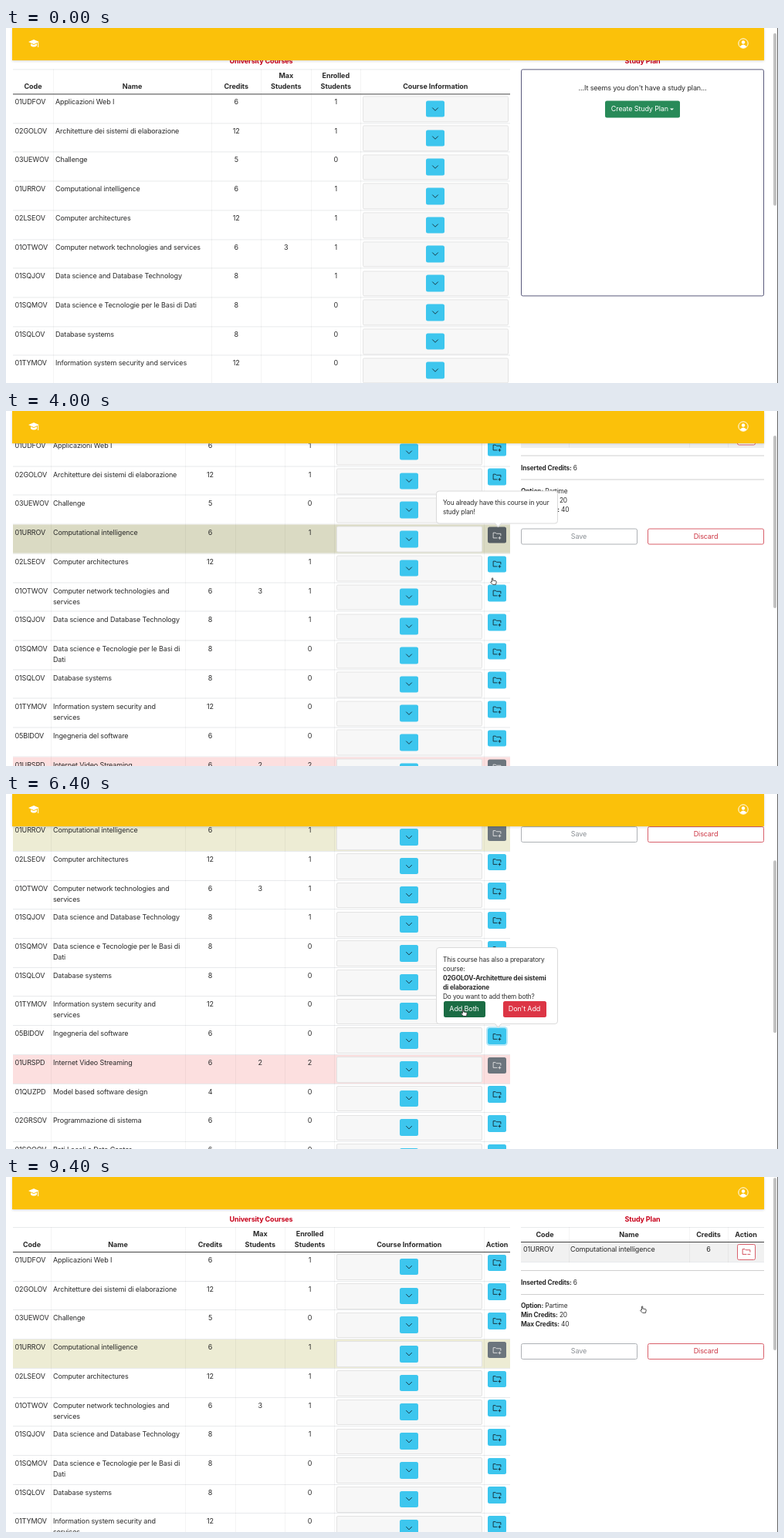
Animation of 1000 by 461 pixels, one loop 9.9 s. Source, as an HTML page:

```html
<!DOCTYPE html>
<html lang="en">
<head>
<meta charset="utf-8">
<title>Study plan</title>
<style>
html, body { margin: 0; width: 100%; height: 100%; overflow: hidden; background: #fff; }
#stage { position: relative; width: 1000px; height: 461px; overflow: hidden; color: #2a2a2a;
  font: 9px/14px Inter, sans-serif; letter-spacing: -.13px; }
#stage div { position: absolute; box-sizing: border-box; }
#stage [hidden] { display: none; }
svg { display: block; fill: none; stroke: currentColor; }
.layer { left: 0; top: 0; width: 1000px; height: 0; }
.t { white-space: pre; }
.c { width: 200px; margin-left: -100px; text-align: center; }
.b, b { font-weight: 700; }
.b { letter-spacing: -.05px; }
.title { font-weight: 700; color: #c8001a; }
.small { font-size: 8.3px; }
.line { background: #e8eaec; }
.dark { background: #444; }
.hr { background: #cfcfcf; }
.col { background: rgba(0, 0, 0, .045); }
.row { border-bottom: 1px solid #e8eaec; }
.taken { background: #edecd4; }
.blocked { background: #f99898; }
.full { background: #fcdfdf; }
.hover { box-shadow: inset 0 0 0 99px rgba(0, 0, 0, .08); }
.stripe.hover { box-shadow: inset 0 0 0 99px rgba(0, 0, 0, .045); }
.fold { background: #f7f7f7; border: 1px solid #e3e3e3; border-radius: 2px; }
.blocked .fold { background: #fff; }
.btn { display: flex; align-items: center; justify-content: center; border-radius: 2.5px; white-space: pre; }
.info { background: #3dc6ee; color: #14242b; }
.taken .add, .blocked .add, .full .add { background: #6c757d; color: #e8e8e8; }
.hover.taken .add { background: #565e64; }
.add.focus { box-shadow: 0 0 0 2px #b5e8f8; }
.stripe { background: #f1f1f1; }
.drop, .discard { border: 1px solid #d9606b; color: #cc3442; background: #fff; }
.drop.hot { background: #c6323f; color: #fff; box-shadow: 0 0 0 1.5px #f0a9b0; }
.save { border: 1px solid #adb1b5; color: #8a8f94; }
.save.on { border-color: #62ac94; color: #2b8a68; }
.box { border: 1px solid #5a5a7c; border-radius: 2.5px; }
.green { background: #288a58; color: #fff; }
.green.hot { background: #1b6c44; }
.green.focus { box-shadow: 0 0 0 2px #9fcfb8; }
.red { background: #dc3545; color: #fff; }
.caret { border: 2.5px solid transparent; border-top-color: #fff; border-bottom: 0; }
.menu { background: #fff; border: 1px solid #dfdfdf; border-radius: 2.5px; }
.pick { background: #e9ecef; }
.pop { background: #fff; border: 1px solid #dadada; border-radius: 4px; }
.pop::after { content: ""; position: absolute; left: var(--tip); bottom: -4px; width: 6px; height: 6px; margin-left: -3px;
  background: #fff; border: solid #dadada; border-width: 0 1px 1px 0; transform: rotate(45deg); }
.ghost::after { display: none; }
#bar { left: 8px; top: 0; width: 974px; height: 41.5px; background: #fbc10a; box-shadow: 0 1px 3px rgba(0, 0, 0, .16); color: #fff; }
#thumb { left: 994px; top: 0; width: 4px; height: 224px; border-radius: 2px; background: #c1c1c1; }
#edge { left: 999px; top: 0; width: 1px; height: 461px; background: #666; }
#hand { left: -4px; top: -5px; }
</style>
</head>
<body>
<div id="stage">
  <div id="page" class="layer"></div>
  <div id="bar">
    <div style="left:21px;top:14px"><svg width="14" height="13" viewBox="0 0 14 13"><path fill="#fff" stroke="none" d="M7 1 14 4 7 7 0 4ZM3 6.2 7 8 11 6.2V9Q7 12 3 9ZM12.2 5h1v6h-1z"/></svg></div>
    <div style="left:940px;top:13px"><svg width="14" height="14" viewBox="0 0 14 14"><circle cx="7" cy="7" r="6.2"/><circle cx="7" cy="5.5" r="2.2" fill="#fff" stroke="none"/><path d="M2.6 11.2Q7 6 11.4 11.2 7 14.6 2.6 11.2Z" fill="#fff" stroke="none"/></svg></div>
  </div>
  <div id="over" class="layer"></div>
  <div id="thumb"></div>
  <div id="edge"></div>
  <div id="hand"><svg width="9" height="10" viewBox="0 0 9 10"><path fill="#fff" stroke="#222" stroke-width=".8" stroke-linejoin="round" d="M2.4 6V1.2Q3.1.2 3.8 1.2V4L7.4 4.6Q8.3 4.9 8.2 6L7.5 9.4H3.6L.7 6.4Q.9 5.2 2.4 6Z"/></svg></div>
</div>
<script>
const LOOP = 9900, TOP = 98, PITCH = 37.72, START = 11.6;
const $ = id => document.getElementById(id);

// code, name (| marks the narrow line break), credits, max, enrolled
const courses = [
  ['01UDFOV', 'Applicazioni Web I', 6, '', 1],
  ['02GOLOV', 'Architetture dei sistemi di elaborazione', 12, '', 1],
  ['03UEWOV', 'Challenge', 5, '', 0],
  ['01URROV', 'Computational intelligence', 6, '', 1],
  ['02LSEOV', 'Computer architectures', 12, '', 1],
  ['01OTWOV', 'Computer network technologies and|services', 6, 3, 1],
  ['01SQJOV', 'Data science and Database Technology', 8, '', 1],
  ['01SQMOV', 'Data science e Tecnologie per le Basi di|Dati', 8, '', 0],
  ['01SQLOV', 'Database systems', 8, '', 0],
  ['01TYMOV', 'Information system security and|services', 12, '', 0],
  ['05BIDOV', 'Ingegneria del software', 6, '', 0],
  ['01URSPD', 'Internet Video Streaming', 6, 2, 2],
  ['01QUZPD', 'Model based software design', 4, '', 0],
  ['02GRSOV', 'Programmazione di sistema', 6, '', 0],
  ['01SQOOV', 'Reti Locali e Data Center', 6, '', 0]
];
const ARCH = 1, INTEL = 3, COMP = 4, SOFT = 10, VIDEO = 11;

const box = (x, y, w, h, cls, body = '', attr = '') =>
  `<div class="${cls}" ${attr} style="left:${x}px;top:${y}px;width:${w}px;height:${h}px">${body}</div>`;
const text = (x, y, s, cls = '') =>
  `<div class="t ${cls}" style="left:${x}px;top:${y - 7}px">${s}</div>`;
const btn = (cx, cy, w, cls, body, attr) => box(cx - w / 2, cy - 10.8, w, 21.6, 'btn ' + cls, body, attr);
const icon = (d, size) => `<svg width="${size}" height="${size}" viewBox="0 0 16 16" stroke-width="1.15"><path d="${d}"/></svg>`;
const group = (id, body) => `<div id="${id}" class="layer" hidden>${body}</div>`;
const mids = edges => edges.slice(1).map((e, i) => (e + edges[i]) / 2);

const FOLDER = 'M8.5 12.5H1.5V3.5H5.5L7 5H14.5V9';
const plus = icon(FOLDER + 'M12.5 10V15M10 12.5H15', 12);
const minus = icon(FOLDER + 'M10 12.5H15', 12);
const chevron = icon('M3 5.5 8 10.5 13 5.5', 12);

function table(edges, action) {
  const mid = mids(edges), last = edges.length - 1;
  const heads = ['Code', 'Name', 'Credits', 'Max|Students', 'Enrolled|Students', 'Course Information', 'Action'];
  let out = box(9, 65, 644, 1, 'line') + text(330.5, 55, 'University Courses', 'c title');
  mid.forEach((x, i) => {
    const lines = heads[i].split('|');
    lines.forEach((s, k) => out += text(x, 88 - 13.6 * (lines.length - 1 - k), s, 'c b'));
  });
  courses.forEach(([code, name, ...nums], i) => {
    let cells = text(2.5, 10, code) + text(edges[1] - 6, 10, name.replace('|', action ? '<br>' : ' '));
    nums.forEach((n, k) => cells += text(mid[k + 2] - 9, 10, n, 'c'));
    cells += box(edges[5] - 6.5, 2.3, 189, 33.5, 'fold') + btn(mid[5] - 9.25, 18.7, 24, 'info', chevron);
    if (action) cells += btn(627, 13.5, 24, 'info add', plus);
    out += box(9, TOP + i * PITCH, 644, PITCH, 'row', cells);
  });
  edges.slice(1, last).forEach(x => out += box(x - .5, 65, 1, 700, 'col'));
  return out + box(9, TOP - 1, 644, 1, 'dark');
}

function plan(list, edges) {
  const mid = mids(edges), end = 84 + 27 * list.length;
  const sum = list.reduce((s, i) => s + courses[i][2], 0);
  let out = box(667, 65, 315, 1, 'line');
  ['Code', 'Name', 'Credits', 'Action'].forEach((s, i) => out += text(mid[i], 74.5, s, 'c b'));
  list.forEach((id, k) => {
    const [code, name, credits] = courses[id];
    out += box(667, 84 + 27 * k, 315, 27, 'row ' + (k % 2 ? '' : 'stripe'),
      text(3, 10, code) + text(edges[1] - 665, 10, name) + text(mid[2] - 667, 10, credits, 'c') +
      btn(mid[3] - 667, 13.5, 24, 'drop', minus));
  });
  edges.slice(1, 4).forEach(x => out += box(x - .5, 65, 1, end - 65, 'col'));
  out += box(667, 83.5, 315, 1, 'dark') + box(667, end + 10, 315, 1, 'hr') + box(667, end + 40.5, 315, 1, 'hr');
  [['Inserted Credits:', sum, 25.7], ['Option:', 'Partime', 56.3], ['Min Credits:', 20, 68.4], ['Max Credits:', 40, 80.4]]
    .forEach(([k, v, y]) => out += text(667, end + y, `<b>${k}</b> ${v}`, 'small'));
  return out + btn(742, end + 115.5, 151, 'save ' + (sum >= 20 ? 'on' : ''), 'Save') +
    btn(906.5, end + 115.5, 151, 'discard', 'Discard');
}

function pop(id, x, y, h, tip, lines, extra = '') {
  const body = lines.map((s, i) => text(8, 14.5 + 12 * i, s, 'small')).join('') + extra;
  return `<div id="${id}" class="pop" hidden style="left:${x}px;top:${y}px;width:158px;height:${h}px;--tip:${tip}px">${body}</div>`;
}

const narrow = [667, 729, 885, 935, 982], wide = [667, 719, 902, 945, 982];
const noPlan = box(666.5, 65, 315.5, 294.5, 'box') +
  text(824.5, 90.4, '...It seems you don\'t have a study plan...', 'c') +
  btn(824.5, 117, 97, 'green', 'Create Study Plan   ', 'id="create"') + box(860, 115.7, 5, 2.5, 'caret') +
  group('menu', box(781.5, 130, 92, 46, 'menu') + box(782.5, 134.5, 90, 18, '', '', 'id="part"') +
    text(791, 143.6, 'Part Time') + text(791, 161.8, 'Full Time'));

$('page').innerHTML =
  group('plain', table([9, 61, 266, 330.5, 395, 459.5, 653])) +
  group('picker', table([9, 58, 232, 297, 361.5, 425.5, 619, 653], true)) +
  text(824.5, 55, 'Study Plan', 'c title') +
  group('noPlan', noPlan) + group('plan0', plan([], narrow)) +
  group('plan1', plan([INTEL], narrow)) + group('plan3', plan([INTEL, SOFT, ARCH], wide));

const removal = ['This course is mandatory for:', '<b>05BIDOV - Ingegneria del software</b>', 'Do you want to remove them both?'];
const yesNo = btn(40.5, 55.5, 29, 'green', 'Yes') + btn(116, 55.5, 25, 'red', 'No');
$('over').innerHTML =
  pop('owned', 557, 166.5, 43, 79, ['You already have this course in your', 'study plan!']) +
  pop('both', 557, 373, 100, 79, ['This course has also a preparatory', 'course:', '<b>02GOLOV-Architetture dei sistemi</b>',
    '<b>di elaborazione</b>', 'Do you want to add them both?'],
    btn(35.5, 79.5, 54, 'green', 'Add Both') + btn(113.5, 79.5, 56, 'red', 'Don\'t Add')) +
  pop('ghost', -1, 0, 70, 79, removal, yesNo) + pop('remove', 834, 60, 76, 129, removal, yesNo);
$('ghost').classList.add('ghost');
$('ghost').style.opacity = .32;

const rows = [...$('picker').querySelectorAll('.row')];
const doomed = $('plan3').querySelectorAll('.row')[2];

const scrollPath = [[3700, START], [4000, 63.5], [4100, 80], [4300, 80], [4900, 174], [6700, 174], [7200, 0]];
const handPath = [[700, 905, 452], [1000, 838, 112], [1200, 838, 112], [1500, 829, 135], [1700, 829, 135],
  [2600, 631, 221], [4500, 631, 221], [5300, 632, 314], [5500, 632, 314], [6100, 593, 284], [6500, 593, 284],
  [7300, 880, 215], [7900, 958, 155], [8300, 958, 155], [8700, 872, 118], [8900, 872, 118],
  [9100, 829, 165], [9200, 829, 165], [9400, 825, 172]];

function along(path, t) {
  const n = path.findIndex(p => p[0] > t);
  if (n < 1) return path[n ? path.length - 1 : 0].slice(1);
  const a = path[n - 1], b = path[n];
  const u = (t - a[0]) / (b[0] - a[0]), k = u * u * (3 - 2 * u);
  return a.slice(1).map((v, i) => v + (b[i + 1] - v) * k);
}

function draw(t) {
  const during = (a, b) => t >= a && t < b;
  const show = (id, on) => $(id).hidden = !on;
  const [scroll] = along(scrollPath, t), [x, y] = along(handPath, t);
  $('page').style.transform = $('over').style.transform = `translateY(${-scroll}px)`;
  $('thumb').style.transform = `translateY(${1 + .49 * scroll}px)`;
  $('hand').style.transform = `translate(${x}px,${y}px)`;
  show('hand', t >= 700);

  const pair = during(6600, 8900);
  show('plain', t < 1800);
  show('noPlan', t < 1800);
  show('picker', t >= 1800);
  show('plan0', during(1800, 2900));
  show('plan1', t >= 2900 && !pair);
  show('plan3', pair);
  show('menu', during(1200, 1800));
  show('owned', during(3100, 4300));
  show('both', during(5500, 6600));
  show('ghost', during(8100, 8200));
  show('remove', during(8200, 8900));
  $('both').style.opacity = t < 5600 ? .5 : 1;

  const hot = (el, on, cls = 'hot') => el.classList.toggle(cls, on);
  hot($('create'), t >= 1000);
  hot($('create'), t >= 1100, 'focus');
  hot($('part'), t >= 1400, 'pick');
  hot($('both').querySelector('.green'), t >= 6000);
  hot($('remove').querySelector('.green'), t >= 8600);
  hot(doomed, during(7800, 8500), 'hover');
  hot(doomed.querySelector('.drop'), during(7800, 8900));

  rows.forEach((row, i) => {
    hot(row, (i === INTEL && t >= 2900) || (pair && (i === ARCH || i === SOFT)), 'taken');
    hot(row, i === COMP && pair, 'blocked');
    hot(row, i === VIDEO, 'full');
    hot(row, (i === INTEL && during(2500, 4300)) || (i === SOFT && during(5100, 5700)), 'hover');
    hot(row.querySelector('.add'), i === SOFT && during(5400, 6600), 'focus');
  });
}

const begin = performance.now();
let shown = -1;
function tick() {
  const t = Math.floor((performance.now() - begin) % LOOP / 100) * 100;
  if (t !== shown) draw(shown = t);
  requestAnimationFrame(tick);
}
tick();
</script>
</body>
</html>
```
